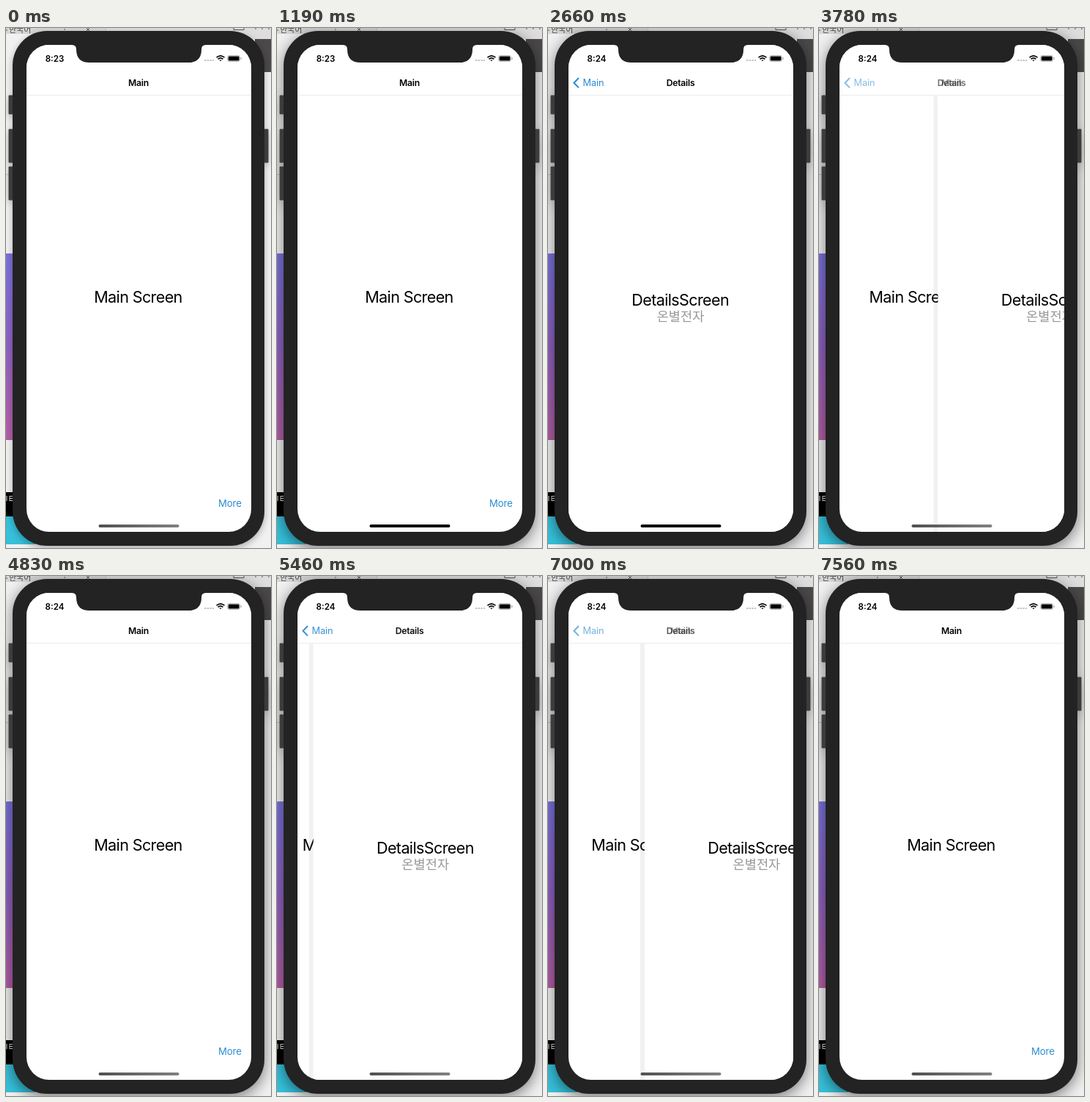
These frames come from a looping animation (362x708 px, 8050 ms). An HTML page:

```html
<!DOCTYPE html>
<html lang="en">
<head>
<meta charset="utf-8">
<style>
  html, body { margin: 0; width: 100%; height: 100%; overflow: hidden; background: #f1f1f1; }
  svg { display: block; width: 362px; height: 708px; }
  text { font-family: Inter, "Noto Sans CJK KR", "Noto Sans CJK", sans-serif; }
  .mid { text-anchor: middle; }
  .title { font-size: 12.2px; font-weight: 600; letter-spacing: -.02em; }
  .big { font-size: 21.6px; letter-spacing: -.03em; }
  .ko { font-family: "Noto Sans CJK KR", "Noto Sans CJK", sans-serif; }
  .blue { fill: #2b8cd2; }
</style>
</head>
<body>
<svg viewBox="0 0 362 708">
  <defs>
    <linearGradient id="purple" x2="0" y2="1">
      <stop stop-color="#7a72dc"/><stop offset=".5" stop-color="#8f62c2"/><stop offset="1" stop-color="#b65fa6"/>
    </linearGradient>
    <linearGradient id="bar"><stop stop-color="#505050"/><stop offset=".5" stop-color="#6a6a6a"/><stop offset="1" stop-color="#808080"/></linearGradient>
    <clipPath id="screen"><rect x="28" y="23" width="307" height="663" rx="31"/></clipPath>
  </defs>

  <!-- desktop behind the phone -->
  <rect width="362" height="708" fill="#f1f1f1"/>
  <rect width="362" height="8" fill="#d6d6d6"/>
  <rect x="136" width="226" height="15" fill="#dedede"/>
  <path d="M136.500 0V8M0 199.500H9" stroke="#c4c4c4"/>
  <text class="ko" x="4" y="6" font-size="11" fill="#444">한국어</text>
  <path d="M0 3h2M79 2h2M110 0l4 4m0-4l-4 4M311 0v2.500h14v-2.500M341 0v2M350 0v2M359 0v2" fill="none" stroke="#555"/>
  <rect x="340" y="15" width="22" height="45" fill="#4b4949"/>
  <rect y="307" width="20" height="254" fill="url(#purple)"/>
  <rect y="632" width="20" height="33" fill="#000"/>
  <path d="M1 637v7M5 637v7M5 637.500h4M5 640.500h4M5 643.500h4" stroke="#ddd"/>
  <rect y="665" width="40" height="38" fill="#36c0da"/>

  <!-- phone body -->
  <g id="phone">
    <path d="M4 92h6v25h-6zM4 138h6v45h-6zM4 189h6v45h-6zM352 138h6v45h-6z" fill="#3c3c3c" stroke="#3c3c3c"/>
    <rect x="9" y="4" width="344" height="701" rx="47" fill="#232323"/>
  </g>

  <g clip-path="url(#screen)">
    <rect x="28" y="23" width="307" height="663" fill="#fff"/>
    <g id="main">
      <text class="big mid" x="180.500" y="374">Main Screen</text>
      <text id="more" class="blue" x="290" y="652" font-size="13.2" letter-spacing="-.1">More</text>
    </g>
    <g id="details">
      <rect x="22" y="92" width="6" height="594" opacity=".055"/>
      <rect x="28" y="92" width="307" height="594" fill="#fff"/>
      <text class="big mid" x="180.700" y="378">DetailsScreen</text>
      <text class="ko mid" x="181" y="399" font-size="17.6" fill="#999">온별전자</text>
    </g>

    <!-- header -->
    <rect x="28" y="23" width="307" height="69" fill="#fff"/>
    <path d="M28 91.500H335" stroke="#ececec"/>
    <text id="mainTitle" class="title mid" x="181" y="79">Main</text>
    <g id="detailsHead">
      <text class="title mid" x="181" y="79">Details</text>
      <path d="M42 68l-6.500 6.700l6.500 6.700" fill="none" stroke="#2b8cd2" stroke-width="2"/>
      <text class="blue" x="47.500" y="79" font-size="12.8" letter-spacing="-.1">Main</text>
    </g>

    <!-- status bar -->
    <text id="clock" class="mid" x="66.500" y="45.500" font-size="11.600" font-weight="600">8:23</text>
    <path d="M271 44h13" stroke="#c4c4c4" stroke-width="2" stroke-dasharray="2.500 1.200"/>
    <g fill="none" stroke="#000" stroke-width="1.600">
      <path d="M287.500 40.200q5.500 -4.800 11 0M289.500 42.300q3.500 -3 7 0"/>
      <path d="M291.300 43.400h3.400l-1.700 1.800z" fill="#000" stroke="none"/>
    </g>
    <rect x="302.500" y="37.500" width="17" height="8" rx="2.200" fill="#fff" stroke="#aaa" stroke-width=".8"/>
    <rect x="303.700" y="38.600" width="14.800" height="5.900" rx="1.200"/>
    <rect x="320.500" y="40" width="1.200" height="3" rx=".6" fill="#aaa"/>

    <rect id="home" x="126.500" y="676" width="110" height="4" rx="2"/>
  </g>
  <path d="M90 22v1q6 0 6 6q0 18 18 18H249q18 0 18-18q0-6 6-6v-1z" fill="#232323"/>
</svg>
<script>
  const LOOP = 8050, STEP = 70, WIDTH = 307, SLIDE = 500;
  const PUSHES = [1342, 5242], POPS = [3714, 6950];
  const $ = id => document.getElementById(id);
  const clamp = v => Math.max(0, Math.min(1, v));

  const cubic = (s, a, b) => 3 * (1 - s) * (1 - s) * s * a + 3 * (1 - s) * s * s * b + s * s * s;

  // cubic-bezier(.2833, .99, .31833, .99)
  function ease(x) {
    if (x <= 0 || x >= 1) return clamp(x);
    let lo = 0, hi = 1;
    for (let i = 0; i < 24; i++) {
      const mid = (lo + hi) / 2;
      if (cubic(mid, .2833, .31833) < x) lo = mid; else hi = mid;
    }
    return cubic(lo, .99, .99);
  }

  const slides = (starts, t) => starts.reduce((sum, s) => sum + ease((t - s) / SLIDE), 0);

  function pressed(t) {
    const start = PUSHES.find(s => t >= s - 132 && t < s + 250);
    if (start === undefined) return 0;
    return t < start ? clamp((t - start + 132) / 150) : 1 - (t - start) / 250;
  }

  function draw(now) {
    const t = Math.floor(now % LOOP / STEP) * STEP;
    const shown = clamp(slides(PUSHES, t) - slides(POPS, t));
    const focused = t >= 1120;

    $("details").setAttribute("transform", `translate(${WIDTH * (1 - shown)})`);
    $("details").style.display = shown ? "" : "none";
    $("main").setAttribute("transform", `translate(${-.3 * WIDTH * shown})`);
    $("mainTitle").style.opacity = 1 - shown;
    $("detailsHead").style.opacity = shown;
    $("more").style.opacity = 1 - .8 * pressed(t);
    $("clock").textContent = t < 2660 ? "8:23" : "8:24";
    $("home").setAttribute("fill", focused && t < 3710 ? "#000" : "url(#bar)");
    $("phone").style.filter = focused
      ? "drop-shadow(0 5px 10px rgba(0,0,0,.5))"
      : "drop-shadow(0 3px 5px rgba(0,0,0,.3))";
  }

  const begin = performance.now();
  function tick() {
    draw(performance.now() - begin);
    requestAnimationFrame(tick);
  }
  tick();
</script>
</body>
</html>
```
